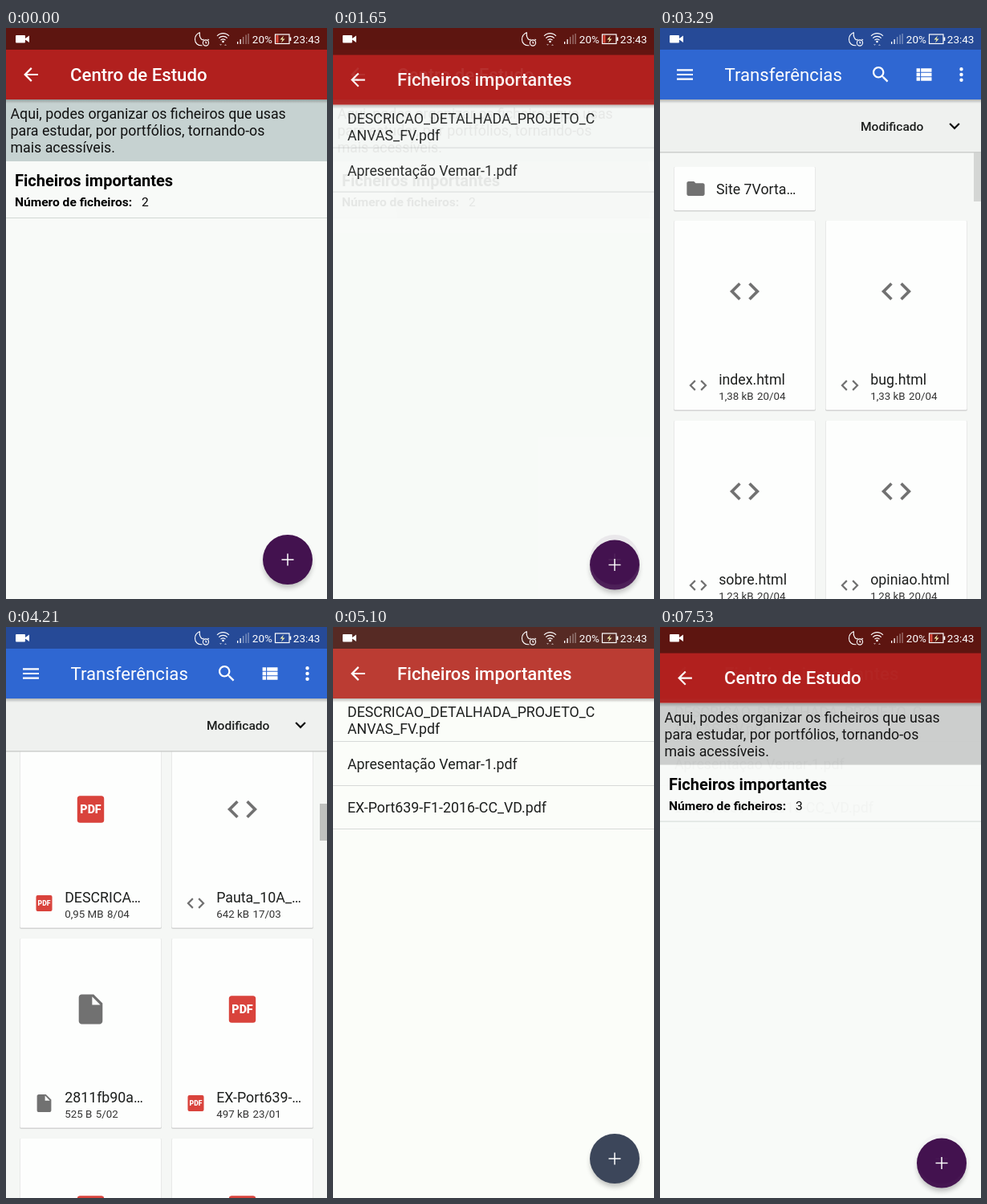
Animation of 400x711 px, one loop 7.62 s. Source, as an HTML page:

```html
<!DOCTYPE html>
<html lang="pt">
<head>
<meta charset="utf-8">
<title>Centro de Estudo</title>
<style>
html, body { margin: 0; width: 100%; height: 100%; overflow: hidden; background: #f8faf8; }
svg { display: block; width: 100vw; height: 100vh; font-family: Roboto, "Noto Sans", sans-serif; }
</style>
</head>
<body>
<svg id="stage" viewBox="0 0 400 711" preserveAspectRatio="none"></svg>
<script>
const LOOP = 7620;
// Bursts of picture updates: first, last, count
const BURSTS = [[90, 550, 6], [1080, 1760, 8], [1870, 1870, 1], [2030, 2710, 8], [2800, 3470, 8],
  [3570, 4310, 9], [4410, 5100, 8], [5900, 5990, 2], [6380, 6690, 4], [7340, 7530, 3]];

const ICON = {
  back: 'M20 11H7.83l5.59-5.59L12 4l-8 8 8 8 1.41-1.41L7.83 13H20z',
  menu: 'M3 18h18v-2H3zm0-5h18v-2H3zm0-7v2h18V6z',
  search: 'M15.5 14h-.79l-.28-.27C15.41 12.59 16 11.11 16 9.5 16 5.91 13.09 3 9.5 3S3 5.91 3 9.5 5.91 16 9.5 16c1.61 0 3.09-.59 4.23-1.57l.27.28v.79l5 4.99L20.49 19zm-6 0C7.01 14 5 11.99 5 9.5S7.01 5 9.5 5 14 7.01 14 9.5 11.99 14 9.5 14z',
  list: 'M4 14h4v-4H4zm0 5h4v-4H4zM4 9h4V5H4zm5 5h12v-4H9zm0 5h12v-4H9zM9 5v4h12V5z',
  more: 'M12 8a2 2 0 1 0 0-4 2 2 0 0 0 0 4zm0 2a2 2 0 1 0 0 4 2 2 0 0 0 0-4zm0 6a2 2 0 1 0 0 4 2 2 0 0 0 0-4z',
  chevron: 'M16.59 8.59L12 13.17 7.41 8.59 6 10l6 6 6-6z',
  folder: 'M10 4H4c-1.1 0-2 .9-2 2v12c0 1.1.9 2 2 2h16c1.1 0 2-.9 2-2V8c0-1.1-.9-2-2-2h-8z',
  code: 'M9.4 16.6L4.8 12l4.6-4.6L8 6l-6 6 6 6zm5.2 0l4.6-4.6-4.6-4.6L16 6l6 6-6 6z',
  file: 'M6 2c-1.1 0-2 .9-2 2v16c0 1.1.9 2 2 2h12c1.1 0 2-.9 2-2V8l-6-6zm7 7V3.5L18.5 9z'
};

const rect = (x, y, w, h, fill, more = '') =>
  `<rect x="${x}" y="${y}" width="${w}" height="${h}" fill="${fill}" ${more}/>`;
const text = (x, y, size, str, fill = '#1d1f1e', weight = 400) =>
  `<text x="${x}" y="${y}" font-size="${size}" font-weight="${weight}" fill="${fill}">${str}</text>`;
const icon = (name, cx, cy, fill = '#fff', s = 1.111) =>
  `<path d="${ICON[name]}" fill="${fill}" transform="translate(${cx} ${cy}) scale(${s}) translate(-12 -12)"/>`;

const shell = (bar, head) =>
  rect(0, 89, 400, 5, 'url(#drop)') + rect(0, -60, 400, 88, bar, 'class="bar"') +
  rect(0, 27, 400, 62, head, 'class="head"');
const redTop = title => shell('#5d1510', '#b1201e') + icon('back', 31, 58) +
  text(80, 65.8, 22.2, title, '#fff', 500);
const fab = id => `<circle cx="351" cy="667" r="30" fill="#000" opacity=".24" filter="url(#soft)"/>
  <circle class="fab" cx="351" cy="662" r="31" fill="#43124f"/>
  <circle id="${id}" cx="351" cy="662" r="31" fill="#14203c" opacity="0"/>
  <path d="M343.5 662h15M351 654.5v15" stroke="#fff" stroke-width="1.5"/>`;

function home() {
  const intro = ['Aqui, podes organizar os ficheiros que usas',
    'para estudar, por portfólios, tornando-os', 'mais acessíveis.'];
  return rect(0, 0, 400, 780, '#f8faf8') + rect(0, 89, 400, 77, '#c6d2d1', 'id="intro"') +
    intro.map((s, i) => text(5.5, 113.3 + i * 21, 17.8, s, '#111')).join('') +
    rect(0, 166, 400, 71, '#000', 'id="press" opacity="0"') +
    '<g clip-path="url(#row)"><circle id="ripple" cx="237" cy="204" r="0" opacity=".055"/></g>' +
    text(11, 197, 20, 'Ficheiros importantes', '#000', 700) +
    text(11, 222, 15.55, 'Número de ficheiros:', '#000', 700) +
    `<text id="count" x="169" y="222" font-size="15.55">2</text>` +
    rect(0, 236, 400, 1, '#d2d8d5') + redTop('Centro de Estudo') + fab('homePress');
}

function files() {
  const line = y => rect(0, y, 400, 1, '#d7dad8');
  return rect(0, 0, 400, 780, '#f8faf8', 'class="page"') +
    text(18, 112, 17.8, 'DESCRICAO_DETALHADA_PROJETO_C') + text(18, 133, 17.8, 'ANVAS_FV.pdf') + line(142) +
    text(18, 177, 17.8, 'Apresentação Vemar-1.pdf') + line(197) +
    `<g id="added">${text(18, 231.4, 17.8, 'EX-Port639-F1-2016-CC_VD.pdf') + line(251)}</g>` +
    redTop('Ficheiros importantes') + fab('filesPress');
}

const pdf = (cx, cy, s) => `<g transform="translate(${cx} ${cy}) scale(${s})">
  <rect x="-16.7" y="-16.7" width="33.4" height="33.4" rx="3.5" fill="#d9433c"/>
  <text y="5" font-size="14.3" font-weight="900" fill="#fff" text-anchor="middle">PDF</text></g>`;
const kindIcon = (kind, cx, cy, s) =>
  kind === 'pdf' ? pdf(cx, cy, s) : icon(kind, cx, cy, '#717171', 1.85 * s);
const cardBox = (x, y, h) => rect(x - .5, y, 177, h + 1.5, '#000', 'rx="2" opacity=".14"') +
  rect(x, y, 176, h, '#fdfefd', 'rx="1.5"');

function card([kind, name, size, date], i) {
  const x = i % 2 ? 206.5 : 17.5, y = 240 + 249 * (i >> 1);
  return cardBox(x, y, 235.5) + kindIcon(kind, x + 88, y + 88, 1) + kindIcon(kind, x + 30, y + 205, .6) +
    text(x + 55.7, y + 203.5, 17.8, name) +
    text(x + 55.7, y + 223, 13.3, `${size} <tspan dx="1.2">${date}</tspan>`, '#333');
}

function picker() {
  const cards = [
    ['code', 'index.html', '1,38 kB', '20/04'], ['code', 'bug.html', '1,33 kB', '20/04'],
    ['code', 'sobre.html', '1,23 kB', '20/04'], ['code', 'opiniao.html', '1,28 kB', '20/04'],
    ['pdf', 'DESCRICA…', '0,95 MB', '8/04'], ['code', 'Pauta_10A_…', '642 kB', '17/03'],
    ['file', '2811fb90a…', '525 B', '5/02'], ['pdf', 'EX-Port639-…', '497 kB', '23/01'],
    ['pdf', '', '', ''], ['pdf', '', '', '']];
  return rect(0, 0, 400, 780, '#f5f7f5') +
    '<g id="grid">' + cardBox(17.5, 173, 54) + icon('folder', 44.5, 200, '#717171') +
    text(70, 207, 17.8, 'Site 7Vorta…') + cards.map(card).join('') +
    rect(206.5, 987, 176, 235.5, '#000', 'id="pick" opacity="0"') + '</g>' +
    rect(391, 155, 9, 61, '#bfc1bf', 'id="thumb"') +
    rect(0, 89, 400, 66, '#eff1ef') + rect(0, 154, 400, 1.5, '#cdcfcd') +
    text(250, 128, 15.55, 'Modificado', '#1d1f1e', 500) + icon('chevron', 367, 122, '#111') +
    shell('#264a97', '#2f67d2').replace(/class="\w+"/g, '') +
    icon('menu', 31, 58) + text(80.5, 65.8, 22.2, 'Transferências', '#fff') +
    icon('search', 275, 58) + icon('list', 328.5, 58) + icon('more', 375.5, 58);
}

const status = `<g fill="#fff">
  <rect x="12" y="9" width="12" height="9.5" rx="1"/><path d="M24 13l5-3.5v8.5l-5-3.5z"/>
  <g fill="none" stroke="#fff" stroke-width="1.1">
    <path d="M241.500 5.500c-4 1.800-6 5.200-6 8.800 0 4.700 3.700 8 9 7.400M241.500 5.500c-.8 4 .5 7.500 3.300 9.500"/>
    <circle cx="249" cy="18.500" r="3.600"/><path d="M249 16.500v2.300h1.600M245 15l1.500-1M253 15l-1.500-1"/>
    <path d="M263 10a10 10 0 0 1 15 0M265.300 12.700a7 7 0 0 1 10.400 0M267.500 15.200a4 4 0 0 1 6 0"/>
  </g>
  <circle cx="270.500" cy="17" r="1.300"/><path d="M266 20h3l-1.500 2zM272 22h3l-1.500-2z" opacity=".5"/>
  <path d="M288 17h1.300v3H288zM291.500 14h1.300v6h-1.300z"/>
  <path d="M295 11h1.300v9H295zM298.500 8.500h1.200v11.500h-1.200zM301.500 7h1.200v13h-1.200z" opacity=".45"/>
  <rect x="335.500" y="8" width="17.500" height="11.500" fill="none" stroke="#fff" stroke-width="1.200"/>
  <rect x="353.500" y="11.500" width="1.800" height="4.500"/>
  <rect id="charge" x="336.500" y="9" width="3" height="9.500" fill="#d8493a"/>
  <path d="M346 9.500l-4.500 5h3l-1.500 4 4.500-5h-3z" fill="#f3efb0"/>
</g>` + text(306.8, 18.5, 13.5, '20%', '#fff') + text(357.8, 18.5, 13.5, '23:43', '#fff');

const stage = document.getElementById('stage');
stage.innerHTML = `<defs>
  <linearGradient id="drop" x2="0" y2="1"><stop stop-opacity=".25"/><stop offset="1" stop-opacity="0"/></linearGradient>
  <filter id="soft" x="-30%" y="-30%" width="160%" height="160%"><feGaussianBlur stdDeviation="3"/></filter>
  <clipPath id="row"><rect y="166" width="400" height="71"/></clipPath></defs>
  <g id="home">${home()}</g><g id="files">${files()}</g><g id="picker">${picker()}</g>${status}`;

const $ = id => document.getElementById(id);
const set = (id, attrs) => { for (const k in attrs) $(id).setAttribute(k, attrs[k]); };
const paint = (cls, fill) => stage.querySelectorAll('.' + cls).forEach(e => e.setAttribute('fill', fill));
const ramp = (t, a, b) => Math.min(1, Math.max(0, (t - a) / (b - a)));

// Hold the picture between updates
function hold(t) {
  let last = 0;
  for (const [a, b, n] of BURSTS) {
    if (t < a) break;
    const step = (b - a) / (n - 1 || 1);
    last = Math.min(b, a + Math.floor((t - a + 15) / (step || 1)) * step);
  }
  return last;
}

// Windows open rising by 8% of the height while fading in
const enter = (t, start) => ({ y: 57 * (1 - ramp(t, start, start + 350)) ** 5, a: ramp(t, start, start + 133) });
function place(id, { y, a }) {
  set(id, { transform: `translate(0 ${y})`, opacity: a, display: a ? 'inline' : 'none' });
}

function draw(now) {
  const t = hold(now), late = t > 7300;
  // At the end the home screen opens above the file list
  const above = $(late ? 'picker' : 'files');
  if ($('home').nextElementSibling !== above) stage.insertBefore($('home'), above);

  place('home', late ? enter(t, 7400) : { y: 0, a: 1 });
  place('files', enter(t, 1540));
  const shut = ramp(t, 4740, 4990);
  place('picker', shut ? { y: 57 * shut ** 4, a: 1 - ramp(t, 4820, 4990) } : enter(t, 2930));

  const down = t < 1080 || late ? 0 : 1;
  set('press', { opacity: down * .05 * ramp(t, 1060, 1200) });
  set('ripple', { r: down * Math.min(250, 53 * (t - 1080) / 194) });
  $('count').textContent = late ? 3 : 2;
  set('intro', { fill: late ? '#cbcdcc' : '#c6d2d1' });
  set('added', { display: t > 4600 ? 'inline' : 'none' });
  set('filesPress', { opacity: t < 3300 ? .2 * ramp(t, 2600, 2710) : 0 });

  const scroll = 1 - (1 - ramp(t, 3520, 4217)) ** 2;
  set('grid', { transform: `translate(0 ${-599 * scroll})` });
  set('thumb', { y: 155 + 65 * scroll, height: 61 - 15 * scroll, opacity: .6 + .4 * ramp(t, 3470, 3600) });
  set('pick', { opacity: .08 * ramp(t, 4400, 4520) });

  const muted = t >= 5050 && t < 5900;
  paint('bar', muted ? '#562a24' : '#5d1510');
  paint('head', muted ? '#bb3c33' : '#b1201e');
  paint('fab', muted ? '#3c465a' : '#43124f');
  paint('page', muted ? '#fbfdf9' : '#f8faf8');
  set('charge', { opacity: t > 3000 && t < 5900 ? 0 : 1 });
}

function tick() {
  draw(performance.now() % LOOP);
  requestAnimationFrame(tick);
}
tick();
</script>
</body>
</html>
```
